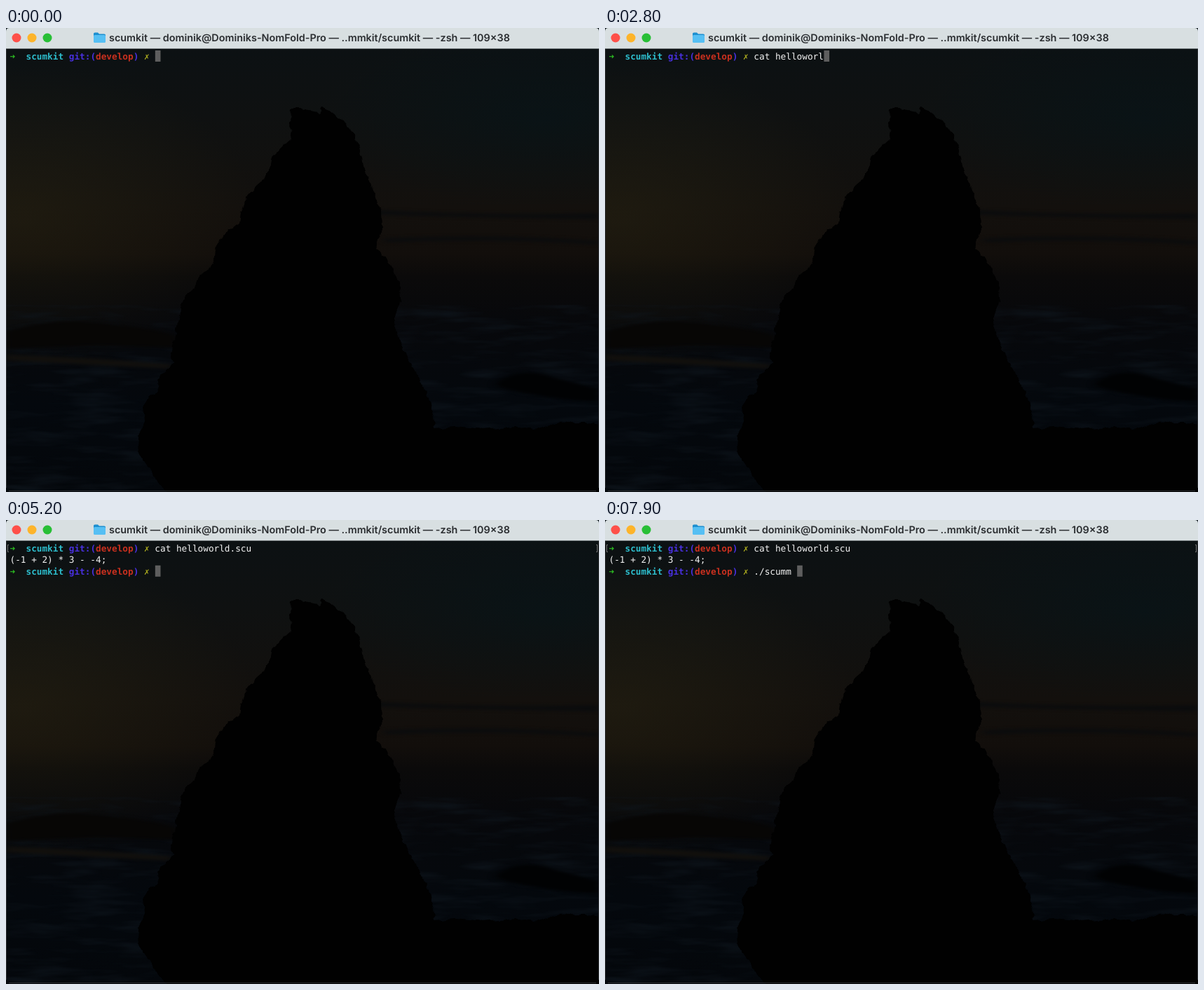
An HTML page for the animation above (8 s loop, 846 by 662 pixels).

```html
<!DOCTYPE html>
<html lang="en">
<head>
<meta charset="utf-8">
<title>Terminal</title>
<style>
  html, body { margin: 0; width: 100%; height: 100%; overflow: hidden; background: #000; }
  svg { display: block; }
  text { white-space: pre; text-rendering: geometricPrecision; }
  filter { color-interpolation-filters: sRGB; }
  .title { font: 600 14.4px Inter, sans-serif; fill: #2a2d30; }
  #screen { font: 12.72px "DejaVu Sans Mono", monospace; }
  .bold { font-weight: bold; }
</style>
</head>
<body>
<svg width="846" height="662" viewBox="0 0 846 662">
  <defs>
    <linearGradient id="sky" x2="0" y2="1">
      <stop offset="0" stop-color="#0c1113"/>
      <stop offset=".3" stop-color="#0f1111"/>
      <stop offset=".7" stop-color="#13100d"/>
      <stop offset=".9" stop-color="#120e0b"/>
      <stop offset="1" stop-color="#0b0a0a"/>
    </linearGradient>
    <linearGradient id="sea" x2="0" y2="1">
      <stop offset="0" stop-color="#0b0a0a"/>
      <stop offset=".2" stop-color="#07080b"/>
      <stop offset=".6" stop-color="#04080d"/>
      <stop offset="1" stop-color="#04070b"/>
    </linearGradient>
    <radialGradient id="glow">
      <stop offset="0" stop-color="#383216" stop-opacity=".3"/>
      <stop offset="1" stop-color="#383216" stop-opacity="0"/>
    </radialGradient>
    <radialGradient id="teal">
      <stop offset="0" stop-color="#02161d" stop-opacity=".4"/>
      <stop offset="1" stop-color="#02161d" stop-opacity="0"/>
    </radialGradient>
    <filter id="soft" x="-5%" y="-5%" width="110%" height="110%">
      <feGaussianBlur stdDeviation="6 2"/>
    </filter>
    <filter id="ripples" x="0" y="0" width="1" height="1">
      <feTurbulence type="fractalNoise" baseFrequency=".012 .08" numOctaves="3" seed="4"/>
      <feColorMatrix values="0 0 0 0 .06  0 0 0 0 .09  0 0 0 0 .12  2.5 0 0 0 -1.1"/>
    </filter>
    <filter id="rough">
      <feTurbulence type="fractalNoise" baseFrequency=".09" numOctaves="2" seed="2"/>
      <feDisplacementMap in="SourceGraphic" scale="8" xChannelSelector="R" yChannelSelector="G"/>
    </filter>
  </defs>

  <rect y="29" width="846" height="326" fill="url(#sky)"/>
  <rect y="354" width="846" height="308" fill="url(#sea)"/>
  <ellipse cx="770" cy="130" rx="330" ry="130" fill="url(#teal)"/>
  <ellipse cx="20" cy="270" rx="340" ry="220" fill="url(#glow)"/>
  <rect y="395" width="846" height="267" filter="url(#ripples)" opacity=".6"/>
  <g filter="url(#soft)">
    <path d="M520 259Q680 268 846 264V273Q680 271 520 266ZM540 300Q700 293 846 304V309Q700 300 540 306Z" fill="#0b0c0d"/>
    <path d="M0 432Q70 412 150 422T244 440V456Q110 450 0 458Z" fill="#070605"/>
    <path d="M0 466Q120 470 236 480V486Q110 480 0 474Z" fill="#12100d"/>
    <path d="M700 505Q735 484 775 496T846 515V533Q770 530 700 512Z" fill="#010203"/>
  </g>
  <path filter="url(#rough)" d="M405 118 410 114 421 114 435 119 446 121 450 114 462 118 479 131 495 150 505 171 510 196 520 221 528 245 536 262 537 285 527 315 540 325 553 345 563 372 564 388 556 405 554 425 563 450 575 475 590 500 602 525 610 555 612 572 640 569 680 573 730 569 757 574 785 563 825 562 856 568V672H235L188 605 191 577 198 560 196 540 205 525 217 520 216 500 239 480 236 465 243 430 250 395 258 378 270 373 276 352 288 346 298 325 300 310 315 290 333 280 335 262 345 240 358 225 370 215 381 183 395 168 407 157 409 148 404 135Z" fill="#010101"/>

  <rect width="846" height="29.500" fill="#d8dfe1"/>
  <path d="M0 0H5Q0 0 0 5ZM846 0H841Q846 0 846 5Z" fill="#222a30"/>
  <path d="M.5 30V656M845.5 30V656M4 660.5H842" stroke="#2c2e31" fill="none"/>
  <circle cx="15" cy="14" r="6.5" fill="#fe5049"/>
  <circle cx="37" cy="14" r="6.5" fill="#fdb42a"/>
  <circle cx="59" cy="14" r="6.5" fill="#28bf36"/>
  <path d="M125 8Q125 6.500 127 6.500H131L133 8.500H140Q142 8.500 142 10V19H125Z" fill="#1d8fd0"/>
  <rect x="125" y="10" width="17" height="11" rx="1.500" fill="#56bff3"/>
  <text class="title" x="147" y="18.500">scumkit — dominik@Dominiks-NomFold-Pro — ..mmkit/scumkit — -zsh — 109×38</text>
  <g id="screen"></g>
</svg>
<script>
  const LOOP = 8000, LEFT = 5.5, COL = 7.66, ROW = 16.4, PROMPT = 27, ENTER = 4400;
  const CAT = 'cat helloworld.scu', RUN = './scumm ';
  // [time in ms, characters typed]
  const catKeys = [[700, 0], [2000, 8], [2800, 13], [3700, 18]];
  const runKeys = [[5900, 0], [6100, 1], [7800, 8]];
  const screen = document.getElementById('screen');

  const put = (col, row, str, color = '#f4f4f4', cls = '') =>
    `<text x="${LEFT + col * COL}" y="${45 + row * ROW}" fill="${color}" class="${cls}">${str}</text>`;

  const prompt = row => [
    [0, '➜', '#2dbd22'], [3, 'scumkit', '#2dbccb'], [11, 'git:(', '#4930df'],
    [16, 'develop', '#c9301f'], [23, ')', '#4930df'], [25, '✗', '#a9a91f']
  ].map(([col, str, color]) => put(col, row, str, color, 'bold')).join('');

  const cursor = (col, row) =>
    `<rect x="${LEFT + col * COL + 0.5}" y="${32 + row * ROW}" width="${COL}" height="16" fill="#5e5e5e"/>`;

  function typed(keys, t) {
    if (t <= keys[0][0]) return 0;
    for (let i = 1; i < keys.length; i++) {
      const [t0, n0] = keys[i - 1], [t1, n1] = keys[i];
      if (t < t1) return Math.floor(n0 + (n1 - n0) * (t - t0) / (t1 - t0));
    }
    return keys[keys.length - 1][1];
  }

  function entry(row, str, n) {
    return prompt(row) + cursor(PROMPT + n, row) + put(PROMPT, row, str.slice(0, n));
  }

  function view(t) {
    if (t < ENTER) return entry(0, CAT, typed(catKeys, t));
    return prompt(0) + put(PROMPT, 0, CAT) + put(0, 1, '(-1 + 2) * 3 - -4;')
      + '<path d="M4 35.5H2.5V45.5H4M842 35.5H843.5V45.5H842" fill="none" stroke="#777"/>'
      + entry(2, RUN, typed(runKeys, t));
  }

  let shown = '';
  function draw() {
    const next = view(performance.now() % LOOP);
    if (next !== shown) screen.innerHTML = shown = next;
    requestAnimationFrame(draw);
  }
  draw();
</script>
</body>
</html>
```
